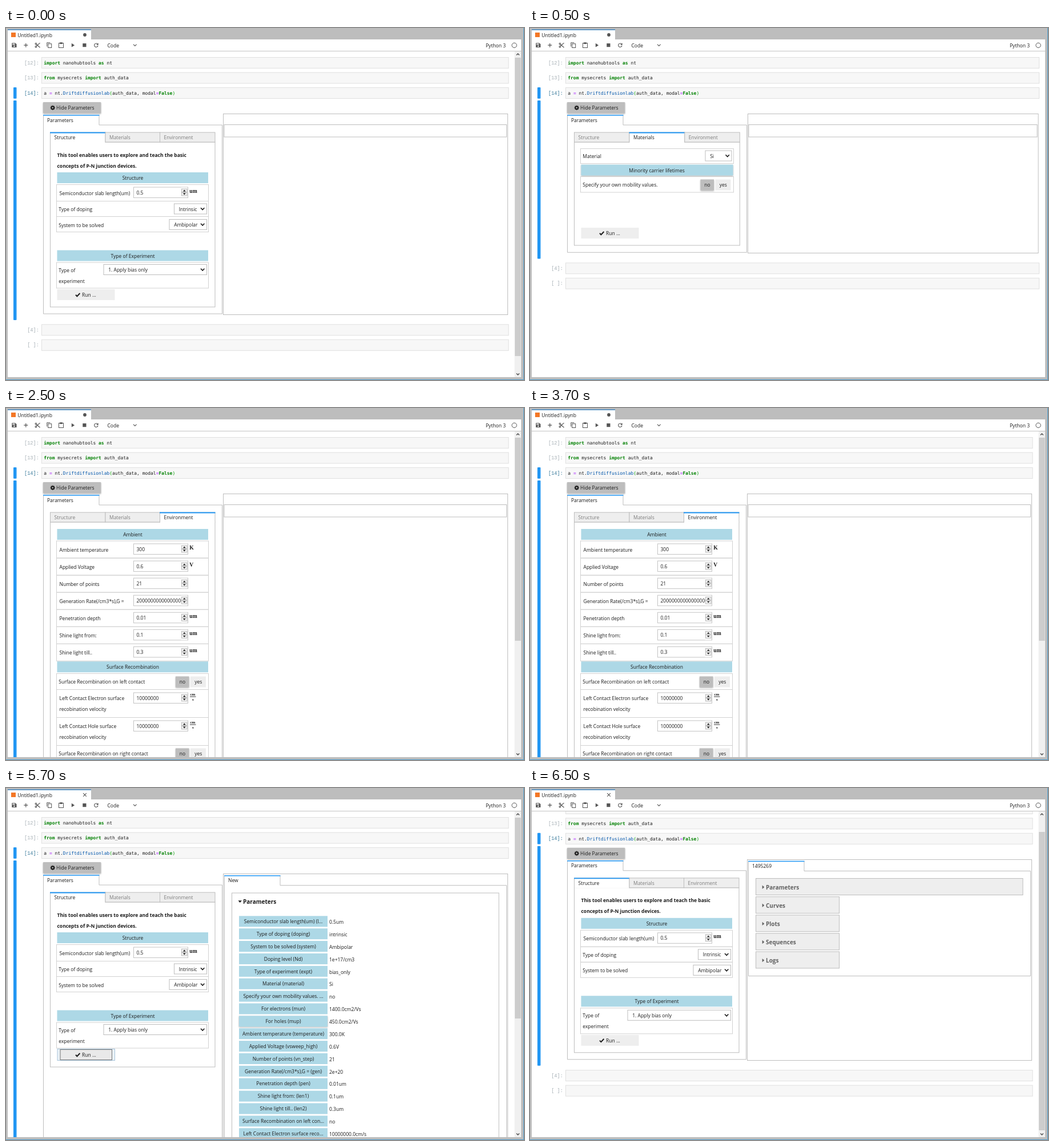
Recreate the animation shown at these times as an HTML page. Size 907x617 px, loop 8 s.

```html
<!DOCTYPE html>
<html lang="en">
<head>
<meta charset="utf-8">
<title>Notebook tool walkthrough</title>
<style>
html, body { margin: 0; width: 100%; height: 100%; overflow: hidden; background: #bdbdbd; }
svg { display: block; width: 907px; height: 617px; }
text { font: 8.5px "Open Sans", "Noto Sans", sans-serif; fill: #1c1c1c; white-space: pre; }
.b { font-weight: 700; }
.head { font-size: 10px; font-weight: 700; }
.code { font: 7.96px "DejaVu Sans Mono", monospace; }
.prompt { font: 8.7px "Liberation Mono", monospace; fill: #a9b2b8; }
.unit { font: bold 9.6px "Liberation Serif", serif; }
.frac { font: bold 7px "Liberation Serif", serif; }
.kw { font-weight: 700; fill: #008000; }
.op { fill: #aa22ff; }
.fn { fill: #0055aa; }
.br { fill: #00a000; }
</style>
</head>
<body>
<svg viewBox="0 0 907 617">
  <defs>
    <clipPath id="page"><rect x="3" y="41" width="899" height="571"/></clipPath>
    <filter id="shade" x="-20%" y="-30%" width="140%" height="180%">
      <feDropShadow dx="0" dy="1" stdDeviation="1" flood-color="#000" flood-opacity=".38"/>
    </filter>
  </defs>
  <g id="frame"></g>
  <g id="view" clip-path="url(#page)"></g>
  <g id="mark"></g>
</svg>
<script>
const LINE = '#bdbdbd', BLUE = '#2196f3', SKY = '#add8e6', PALE = '#eee', INK = '#1c1c1c';
const $ = id => document.getElementById(id);

// Primitives; boxes are given by their edges
const box = (x1, y1, x2, y2, fill = 'none', stroke = 'none', extra = '') =>
  `<rect x="${x1}" y="${y1}" width="${x2 - x1}" height="${y2 - y1}" fill="${fill}" stroke="${stroke}" ${extra}/>`;
const path = (d, stroke = LINE, fill = 'none', w = 1) =>
  `<path d="${d}" fill="${fill}" stroke="${stroke}" stroke-width="${w}"/>`;
const shape = (d, fill = INK) => path(d, 'none', fill);
const text = (x, y, s, cls = '', extra = '') => `<text x="${x}" y="${y}" class="${cls}" ${extra}>${s}</text>`;
const mid = (x, y, s, extra = '') => text(x, y, s, '', `text-anchor="middle" ${extra}`);
const move = (y, s) => `<g transform="translate(0 ${y})">${s}</g>`;
const SHADE = 'filter="url(#shade)"';

// Form parts
const row = (y1, y2, right = 355) => box(88.5, y1, right - .5, y2, 'none', '#d2d2d2');
const bar = (y, s, right = 354, extra = '') =>
  box(89.5, y, right, y + 19, SKY, 'none', extra) + mid(222, y + 13, s);

function spinner(y) {
  const x = 312.3;
  return box(307.5, y - 6, 317, y - .3, '#f0f0f0', '#adadad', 'stroke-width=".8"') +
    box(307.5, y + .3, 317, y + 6, '#f0f0f0', '#adadad', 'stroke-width=".8"') +
    shape(`M${x - 2.4} ${y - 1.6}h4.8l-2.4-2.8zM${x - 2.4} ${y + 1.6}h4.8l-2.4 2.8z`);
}

function input(y, value, unit = '') {
  const c = y + 9.5;
  let out = box(223.5, y + .5, 318.5, y + 19, '#fff', '#c4c4c4') + text(228.5, c + 3.5, value);
  out += box(306.5, y + 1, 318, y + 18.5, '#fff') + spinner(c);
  if (unit === 'cm/s') {
    out += text(322.5, y + 5, 'cm', 'frac') + path(`M322 ${y + 7.5}h10.5`, '#333') + text(326, y + 14, 's', 'frac');
  } else out += text(321.3, y + 10, unit, 'unit');
  return out;
}

const select = (x1, x2, y, s) => box(x1 + .5, y + .5, x2 - .5, y + 18.5, '#fff', LINE) +
  text(x1 + 8.7, y + 13, s) + path(`M${x2 - 11} ${y + 7.7}l3.2 3.4 3.2-3.4`, INK, 'none', 1.6);

const toggle = (x, y) => box(x, y, x + 23.5, y + 19, LINE, 'none', SHADE) + mid(x + 12, y + 12.5, 'no') +
  box(x + 26, y, x + 53, y + 19, PALE) + mid(x + 39.7, y + 12.5, 'yes');

function runButton(y, pressed) {
  let out = box(89.5, y, 190.5, y + 19, PALE);
  if (pressed) {
    out = box(90, y - .5, 190.5, y + 19.5, '#eaf1f6', '#a9c6dc') +
      box(95, y + .5, 185.5, y + 18.5, '#e9e9e9', '#777');
  }
  return out + path(`M122 ${y + 9.8}l2.4 2.5 5-5.3`, INK, 'none', 2) + text(133, y + 13, 'Run ...');
}

function gear(x, y) {
  let teeth = '';
  for (let a = 0; a < 8; a++) {
    teeth += `<rect x="${x - .9}" y="${y - 4}" width="1.8" height="2" fill="${INK}" transform="rotate(${a * 45} ${x} ${y})"/>`;
  }
  return teeth + `<circle cx="${x}" cy="${y}" r="2.2" fill="none" stroke="${INK}" stroke-width="1.8"/>`;
}

// A lone tab joined to the panel below it
const outerTab = (x, y, label, right, bottom) =>
  path(`M${x + .5} ${y}V${bottom}H${right}V${y + 17.5}H${x + 98}V${y}`) +
  path(`M${x} ${y + .5}h98.5`, BLUE, 'none', 1.6) + text(x + 7, y + 12, label);

function innerTabs(active, right, bottom) {
  const edges = [77.5, 174, right - 96.5, right];
  let out = box(77.5, 200, right, bottom, 'none', LINE);
  ['Structure', 'Materials', 'Environment'].forEach((name, i) => {
    const a = edges[i], b = edges[i + 1], on = i === active;
    out += box(a, 183, b, 200, on ? '#fff' : PALE, LINE);
    if (on) out += box(a + .5, 199, b - .5, 201, '#fff') + path(`M${a - .5} 183.5H${b + .5}`, BLUE, 'none', 1.8);
    out += text(a + 7, 195, name, '', on ? '' : 'style="fill:#7b7b7b"');
  });
  return out;
}

// Notebook cells
const cell = (y, n, code, right, style = '') =>
  text(58, y + 12.5, `[${n}]:`, 'prompt', `text-anchor="end" ${style}`) +
  box(62.5, y + .5, right, y + 19.5, '#f7f7f7', '#e0e0e0') + text(66.3, y + 12.8, code, 'code');
const span = (cls, s) => `<tspan class="${cls}">${s}</tspan>`;
const kw = s => span('kw', s);

const cells = right =>
  cell(51, 12, `${kw('import')} nanohubtools ${kw('as')} nt`, right) +
  cell(77.5, 13, `${kw('from')} mysecrets ${kw('import')} auth_data`, right) +
  cell(104, 14, `a ${span('op', '=')} nt.${span('fn', 'Driftdiffusionlab')}${span('br', '(')}auth_data, modal` +
    `${span('op', '=')}${kw('False')}${span('br', ')')}`, right, 'style="fill:#3d7d9d"');
const spare = (y, right) => cell(y, 4, '', right) + cell(y + 26.5, ' ', '', right);

// Everything shared by the pages: code, blue bars, left panel
const shell = (right, barEnd, panelRight, panelEnd) => cells(right) +
  box(13, 104, 18.5, 123.7, BLUE, 'none', 'rx="1"') + box(13, 127, 18.5, barEnd, BLUE, 'none', 'rx="1"') +
  box(65, 130, 166.3, 149.5, LINE, 'none', `${SHADE} rx="1"`) + gear(81.7, 139.8) + text(88, 143, 'Hide Parameters') +
  outerTab(65, 152.5, 'Parameters', panelRight, panelEnd);

const emptyResult = (x, right, bottom) => box(x + .5, 150.5, right - .5, bottom, 'none', LINE) +
  box(x + 2, 169.5, right - 2.5, 191, 'none', LINE);

const structure = pressed => innerTabs(0, 366, 489) +
  text(89.5, 225.5, 'This tool enables users to explore and teach the basic', 'b') +
  text(89.5, 244.5, 'concepts of P-N junction devices.', 'b') +
  bar(253, 'Structure') +
  row(274.5, 303.5) + text(93.5, 292.5, 'Semiconductor slab length(um)') + input(278.5, '0.5', 'um') +
  row(303.5, 330.5) + text(92.3, 321, 'Type of doping') + select(294, 352, 307.5, 'Intrinsic') +
  row(330.5, 357.5) + text(92.3, 348.5, 'System to be solved') + select(285.5, 352, 335, 'Ambipolar') +
  bar(389.5, 'Type of Experiment') +
  row(411, 456) + text(92.3, 427.5, 'Type of') + text(92.3, 446.7, 'experiment') +
  select(170.5, 352, 414, '1. Apply bias only') + runButton(458, pressed);

const materials = () => innerTabs(1, 367.3, 381) +
  row(211.5, 237.5, 357) + text(92.3, 228, 'Material') + select(306.5, 353.5, 214.5, 'Si') +
  bar(239.5, 'Minority carrier lifetimes', 355.5, SHADE) +
  row(260.5, 288, 357) + text(92.3, 277.5, 'Specify your own mobility values.') + toggle(298.5, 265.5) +
  runButton(350);

function environment() {
  const fields = [['Ambient temperature', '300', 'K'], ['Applied Voltage', '0.6', 'V'], ['Number of points', '21'],
    ['Generation Rate(/cm3*s),G =', '20000000000000000'], ['Penetration depth', '0.01', 'um'],
    ['Shine light from:', '0.1', 'um'], ['Shine light till..', '0.3', 'um']];
  let out = innerTabs(2, 366, 700) + bar(212, 'Ambient');
  fields.forEach(([label, value, unit], i) => {
    const y = 30.07 * i;
    out += row(233 + y, 263 + y) + text(93.5, 251.5 + y, label) + input(237.5 + y, value, unit);
  });
  out += bar(444.3, 'Surface Recombination');
  ['left', 'right'].forEach((side, i) => {
    const y = 126 * i;
    out += row(465.5 + y, 493.5 + y) + text(92.3, 482.5 + y, `Surface Recombination on ${side} contact`) + toggle(297, 470.5 + y);
  });
  ['Electron', 'Hole'].forEach((kind, i) => {
    const y = 49 * i;
    out += row(493.5 + y, 542.5 + y) + text(93.5, 512 + y, `Left Contact ${kind} surface`) +
      text(93.5, 531 + y, 'recobination velocity') + input(498.5 + y, '10000000', 'cm/s');
  });
  return out;
}

function newResult() {
  const rows = [['Semiconductor slab length(um) (l...', '0.5um'], ['Type of doping (doping)', 'intrinsic'],
    ['System to be solved (system)', 'Ambipolar'], ['Doping level (Nd)', '1e+17/cm3'],
    ['Type of experiment (expt)', 'bias_only'], ['Material (material)', 'Si'],
    ['Specify your own mobility values. ...', 'no'], ['For electrons (mun)', '1400.0cm2/Vs'],
    ['For holes (mup)', '450.0cm2/Vs'], ['Ambient temperature (temperature)', '300.0K'],
    ['Applied Voltage (vsweep_high)', '0.6V'], ['Number of points (vn_step)', '21'],
    ['Generation Rate(/cm3*s),G = (gen)', '2e+20'], ['Penetration depth (pen)', '0.01um'],
    ['Shine light from: (len1)', '0.1um'], ['Shine light till.. (len2)', '0.3um'],
    ['Surface Recombination on left con...', 'no'], ['Left Contact Electron surface reco...', '10000000.0cm/s']];
  let out = box(380.5, 150.5, 878.5, 700, 'none', LINE) + outerTab(382, 153.2, 'New', 876.5, 700) +
    box(395.5, 184, 863, 700, 'none', LINE) + shape('M406.5 197.3h6.4l-3.2 3.8z') + text(415, 203, 'Parameters', 'head');
  rows.forEach(([name, value], i) => {
    const y = 224.3 + 21.88 * i;
    out += box(408, y, 563, y + 19, SKY, 'none', i === 8 ? SHADE : '') + mid(485.5, y + 12.7, name) + text(566, y + 13.7, value);
  });
  return out;
}

function doneResult() {
  let out = box(380.5, 125.5, 878.5, 477.5, 'none', LINE) + outerTab(382, 128, '1495269', 876.5, 329.5);
  ['Parameters', 'Curves', 'Plots', 'Sequences', 'Logs'].forEach((name, i) => {
    const y = 158.5 + 32.1 * i;
    out += box(395.5, y, i ? 541.5 : 863, y + 29, PALE, LINE) + shape(`M406.7 ${y + 12}v6.4l3.6-3.2z`, '#616161') +
      text(413, y + 19, name, 'head', 'style="fill:#616161"');
  });
  return out;
}

const scrollbar = (top, end) => box(890.5, 41, 902, 612, '#f0f0f0') + box(891, top, 901.5, end, '#cdcdcd') +
  path('M893.8 47.6l2.5-2.6 2.5 2.6M893.8 605.4l2.5 2.6 2.5-2.6', '#505050', 'none', 1.5);

const dot = `<circle cx="138" cy="12" r="2.9" fill="#555"/>`;
const cross = path('M135.2 9.2l5.6 5.6m0-5.6l-5.6 5.6', '#555', 'none', 1.1);

const scenes = [
  { end: 500, mark: dot, view: shell(880, 512, 378.5, 501) + structure() + emptyResult(380, 879, 502.5) +
      spare(519.3, 880) + scrollbar(52, 575) },
  { end: 2500, mark: dot, view: shell(891.5, 404.5, 379.5, 393.3) + materials() + emptyResult(381, 890.5, 394.5) +
      spare(411.3, 891.5) },
  { end: 4500, mark: dot, view: shell(880, 700, 378.5, 700) + environment() + emptyResult(380, 879, 700) +
      scrollbar(52, 408) },
  { end: 6500, mark: cross, view: shell(880, 700, 378.5, 700) + structure(true) + newResult() + scrollbar(52, 404) },
  { end: 8000, mark: cross, view: move(-25.2, shell(880, 512, 378.5, 501) + structure() + spare(519.3, 880)) +
      doneResult() + scrollbar(77, 600) }
];

function drawFrame() {
  const grey = '#555';
  $('frame').innerHTML = box(0, 0, 907, 617, LINE) + path('M906.5 0V616.5H0', '#4d9ccc') +
    box(3, 3, 149, 21, '#fff') + path('M3 3h146', '#3c82bd', 'none', 1.5) +
    box(3, 20, 902, 612, '#fff') + path('M3 40.5h899', '#c4c4c4') +
    box(9, 8, 17, 16, '#f37726') + text(20.3, 15.5, 'Untitled1.ipynb') +
    // save, add
    shape('M10.3 26.2h6l2.2 2.2v5.6h-8.2z', grey) + box(11.5, 27.3, 15.6, 29.2, '#fff') +
    `<circle cx="14.4" cy="31.7" r="1.2" fill="#fff"/>` + path('M31.3 30.2h7M34.8 26.7v7', grey, 'none', 1.2) +
    // cut
    path('M53 28.5l6.5 5.7M53 31.8l6.5-5.7', grey, 'none', 1.2) +
    `<g fill="none" stroke="${grey}" stroke-width="1.1"><circle cx="52.4" cy="27.6" r="1.3"/><circle cx="52.4" cy="32.8" r="1.3"/></g>` +
    // copy, paste
    path('M71.7 32.5v-6.8h5.8', grey) + box(73.7, 27.7, 79.7, 34.5, 'none', grey) +
    box(92.5, 26.5, 100.5, 34.5, 'none', grey) + box(94.3, 25.2, 98.7, 28, grey) +
    // run, stop, restart
    shape('M114.8 26.8v6.8l5.3-3.4z', grey) + box(134.3, 27, 140.5, 33.2, grey) +
    path('M160.2 28a3.2 3.2 0 1 0 .8 3', grey, 'none', 1.1) + shape('M161.7 26.2v3.6h-3.6z', grey) +
    text(177.5, 33.5, 'Code') + path('M223 28.7l2.8 2.8 2.8-2.8', grey, 'none', 1.1) +
    text(840, 33.5, 'Python 3') + `<circle cx="890" cy="30.3" r="4.2" fill="none" stroke="${grey}" stroke-width="1"/>`;
}

let shown = null;
function render(ms) {
  const t = ms % 8000, scene = scenes.find(s => t < s.end);
  if (scene === shown) return;
  shown = scene;
  $('view').innerHTML = scene.view;
  $('mark').innerHTML = scene.mark;
}

drawFrame();
const start = performance.now();
function tick() {
  render(performance.now() - start);
  requestAnimationFrame(tick);
}
tick();
</script>
</body>
</html>
```
